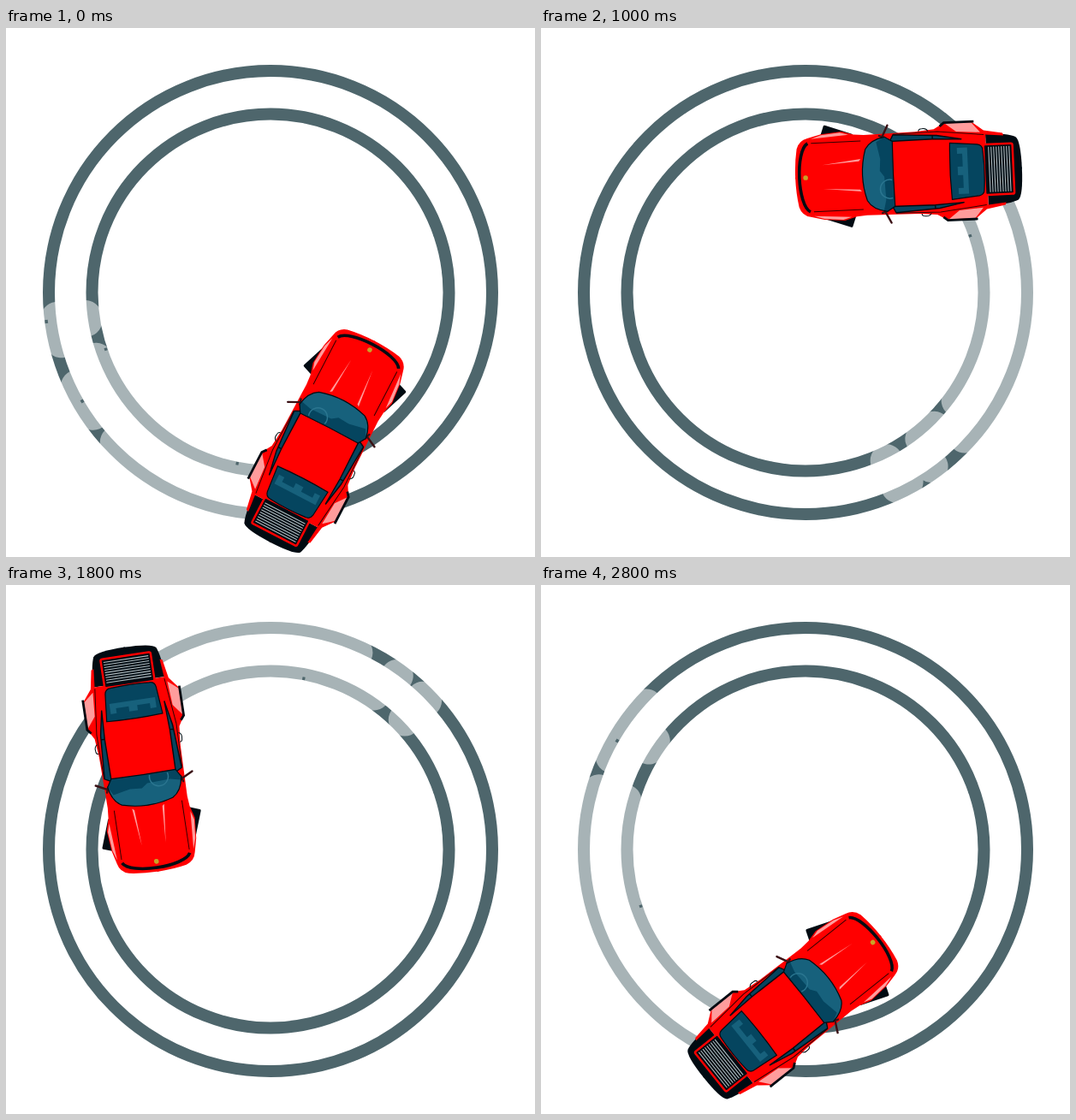
An HTML page that plays this animation: 618x618 px, repeating every 3000 ms.

```html
<!DOCTYPE html>
<html lang="en">
<head>
<meta charset="utf-8">
<title>Drifting car</title>
<style>
  html, body { margin: 0; width: 100%; height: 100%; overflow: hidden; background: #fff; }
  svg { display: block; width: 100vw; height: 100vh; }
</style>
</head>
<body>
<svg viewBox="0 0 618 618">
  <defs>
    <g id="side">
      <path d="M-133,1 Q-133,-33 -127,-37 Q-118,-41 -92,-43 V1Z" fill="#000b12"/>
      <path d="M-92,1 V-41 L-113,-39 L-112,-42 L-90,-46 L-76,-57 H-44 L-32,-50 L-10,-48 L50,-47 L62,-48 L76,-52 L100,-50
               L116,-46 Q126,-44 129,-34 Q132,-18 132,1Z" fill="red"/>
      <path d="M-86,-44 L-76,-56 H-45 L-58,-46Z M68,-48 L78,-51 L100,-49 L112,-45Z" fill="#ff9c9c"/>
      <path d="M-79,-57 H-44 L-39,-53" fill="none" stroke="#000b12" stroke-width="2.8"/>
      <path d="M-90,-41 L-36,-47 L16,-46 M54,-40 L112,-40" fill="none" stroke="#300" stroke-width="1"/>
      <path d="M-64,-37 L-35,-42.5 L16,-45.5 L20,-38 L-30,-38.5Z M-30,-42.5 V-38" fill="#05455f" stroke="#000b12" stroke-width="1.4"/>
      <path d="M-25,-48 Q-23,-52 -18,-51 Q-14,-51 -14,-48" fill="none" stroke="#000b12"/>
      <path d="M26,-43 L32,-45 M29,-43 L22,-57" stroke="#3a1014" stroke-width="2.4" stroke-linecap="round"/>
      <path d="M55,-19 L57,-16.5 L100,-14Z" fill="#ff9c9c"/>
    </g>
    <rect id="tire" x="-18" y="-8" width="36" height="16" rx="1.5" fill="#000b12"/>
    <path id="windshield" d="M17,-38 Q18,0 17,38 L26,43.5 Q43,41 49,30 Q58,0 49,-30 Q43,-41 26,-43.5Z"/>
  </defs>

  <g fill="none" stroke="#4e666c" stroke-width="14">
    <circle cx="309" cy="309" r="259"/>
    <circle cx="309" cy="309" r="208.5"/>
  </g>
  <g id="trail">
    <path id="smoke" fill="none" stroke="#fff" stroke-opacity=".5" stroke-width="38" stroke-linecap="round"/>
    <path id="chips" stroke="#4e666c" stroke-width="3.5"/>
  </g>

  <g id="car">
    <g transform="translate(189 448.4) rotate(-2.6)">
      <use href="#tire" transform="translate(82 -47) rotate(20)"/>
      <use href="#tire" transform="translate(82 47) rotate(20)"/>
      <use href="#side"/>
      <use href="#side" transform="scale(1 -1)"/>
      <rect x="-123" y="-29.5" width="34" height="59" rx="2" fill="#000b12" stroke="red" stroke-width="2.5"/>
      <path id="grille" stroke="#aeb9bd" stroke-width="1.1"/>
      <path d="M-50,-33 L-82,-30 Q-88,-29 -88,-23 Q-90,0 -88,23 Q-88,29 -82,30 L-50,33 Q-48,0 -50,-33Z" fill="#05455f" stroke="#000b12" stroke-width="1.2"/>
      <path d="M-70,-27 H-58 V-20 H-64 V-5 H-58 V5 H-64 V20 H-58 V27 H-70Z" fill="#17617c"/>
      <use href="#windshield" fill="#17617c"/>
      <path d="M17,-38 Q18,0 17,38 L26,43.5 L36,38 L32,18 L33,4 L28,-3 L27,-30 L30,-42 L26,-43.5Z" fill="#05455f"/>
      <path d="M19,-28 A11,11 0 1 1 19,-7" fill="none" stroke="#2b7690" stroke-width="1.5"/>
      <use href="#windshield" fill="none" stroke="#000b12" stroke-width="1.2"/>
      <path d="M116,-40 C131,-32 131,32 116,40" fill="none" stroke="#000b12" stroke-width="3.6"/>
      <circle cx="120" r="2.8" fill="#c9a227"/>
    </g>
  </g>
</svg>
<script>
  const byId = id => document.getElementById(id);
  const CENTER = 309;

  // Smoke drifts between the two tracks, so its radii lie a little towards the middle.
  const OUTER = 251, INNER = 218, CAP = 16.7;

  // Edges of the smoke patches in degrees, from the tail towards the car;
  // the last patch always reaches the car. Chips are [angle, radius].
  const PATTERNS = [
    { outer: [177, 163, 158, 141.8, 139.7], inner: [177, 167, 163.5], chips: [[150, 254], [172.6, 264]] },
    { outer: [166, 141.8, 139.7], inner: [160, 148.5, 139.5], chips: [[150, 254]] },
    { outer: [153, 142, 139.5, 124, 120], inner: [150, 144, 136], chips: [] },
    { outer: [140, 131.3, 129.5, 122.6, 117.4], inner: [139, 133, 128], chips: [] },
    { outer: [128.5, 118, 117, 111, 106], inner: [128, 120.5, 116, 102, 99.8], chips: [] },
    { outer: [177.3], inner: [177, 167.5, 162.5], chips: [[173, 264]] }
  ];

  function point(radius, degrees) {
    const a = degrees * Math.PI / 180;
    return (CENTER + radius * Math.cos(a)).toFixed(2) + ',' + (CENTER + radius * Math.sin(a)).toFixed(2);
  }

  function patch(radius, from, to) {
    const inset = Math.min(CAP / radius * 180 / Math.PI, (from - to) / 2 - 0.01);
    return `M${point(radius, from - inset)}A${radius},${radius} 0 0 0 ${point(radius, to + inset)}`;
  }

  function patches(radius, edges, shift, carAngle) {
    let d = '';
    for (let i = 0; i < edges.length; i += 2) {
      const end = i + 1 < edges.length ? edges[i + 1] - shift : carAngle;
      d += patch(radius, edges[i] - shift, end);
    }
    return d;
  }

  const chip = (angle, radius) => `M${point(radius, angle - 0.45)}L${point(radius, angle + 0.45)}`;

  function draw(time) {
    const tick = Math.floor(time % 3000 / 100);
    const turn = tick >= 15 ? 180 : 0;
    const step = Math.min(tick % 15, 13);
    byId('car').setAttribute('transform', `rotate(${300 - 12 * step - turn} ${CENTER} ${CENTER})`);
    byId('trail').setAttribute('transform', `rotate(${turn} ${CENTER} ${CENTER})`);

    // The smoke clears in 60 degree groups and pauses once per group.
    const cleared = step - Math.floor(step / 6);
    const shift = 60 * Math.floor(cleared / 5);
    const { outer, inner, chips } = PATTERNS[cleared % 5 || (step ? 5 : 0)];
    const carAngle = 86 - 12 * step;
    byId('smoke').setAttribute('d',
      patches(OUTER, outer, shift, carAngle) + patches(INNER, inner, shift, carAngle));

    let marks = chips.map(([angle, radius]) => chip(angle - shift, radius)).join('');
    for (let angle = 41; angle < 401; angle += 60) marks += chip(angle, 203.5);
    byId('chips').setAttribute('d', marks);
  }

  let slats = '';
  for (let x = -119; x <= -93; x += 3) slats += `M${x},-26.5V26.5`;
  byId('grille').setAttribute('d', slats);

  const start = performance.now();
  function loop() {
    draw(performance.now() - start);
    requestAnimationFrame(loop);
  }
  loop();
</script>
</body>
</html>
```
